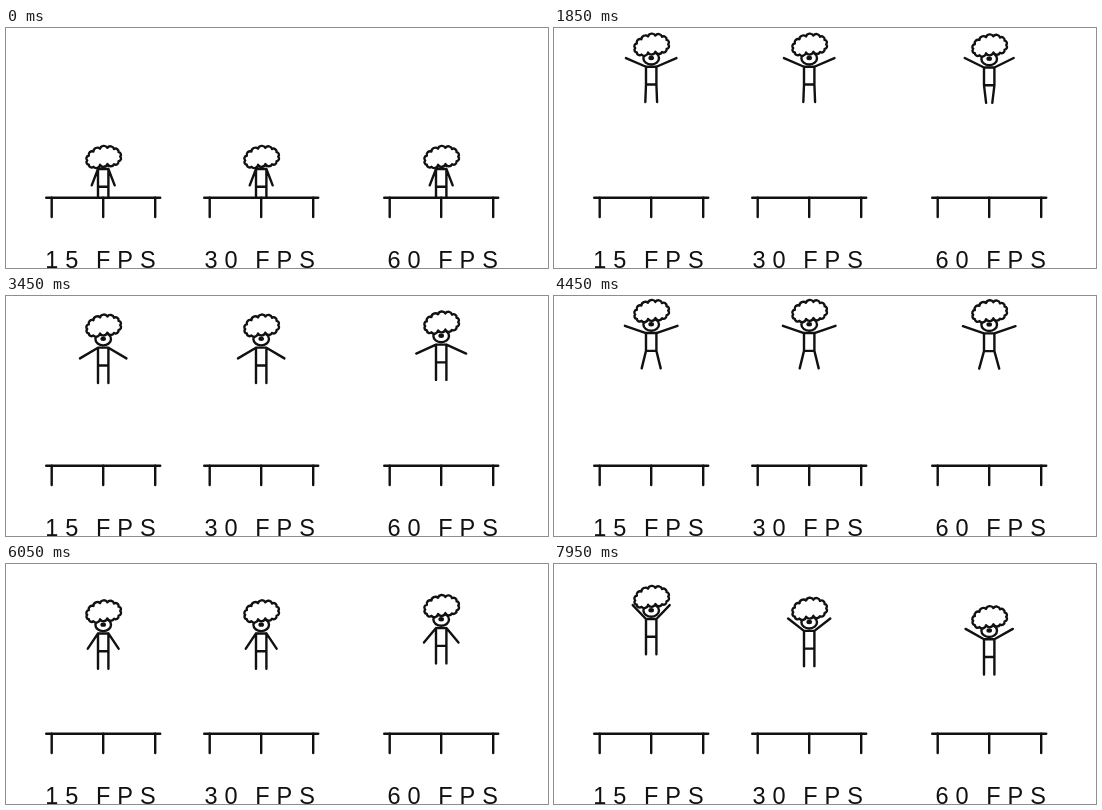
Write an HTML page that moves like this. It is 542 by 240 pixels and loops after 8 s.

```html
<!DOCTYPE html>
<html lang="en">
<head>
<meta charset="utf-8">
<title>Frame rate comparison</title>
<style>
  html, body { margin: 0; width: 100%; height: 100%; overflow: hidden; background: #fff; }
  svg { display: block; width: 542px; height: 240px; }
  path, ellipse { fill: none; stroke: #111; stroke-width: 2.4; stroke-linecap: round; stroke-linejoin: round; }
  .solid { fill: #fff; }
  .eye { fill: #111; stroke: none; }
  text { font: 23.5px "Liberation Sans", Arial, sans-serif; letter-spacing: 7px; word-spacing: -3px; fill: #111; }
</style>
</head>
<body>
<svg id="stage" viewBox="0 0 542 240"></svg>
<script>
const STEP_MS = 50, LOOP_STEPS = 160, JUMP_STEPS = 56;
const BED_Y = 169.8, TOP_Y = 36, JUMP_HEIGHT = 105;

function smoothstep(from, to, step) {
  const u = Math.min(1, Math.max(0, (step - from) / (to - from)));
  return u * u * (3 - 2 * u);
}

// Quick rise that slows down, then a fall that speeds up and settles
function shoulderY(step) {
  const rise = Math.max(0, 1 - step / 28) ** 3.4;
  const t = step - 48.2;
  const fall = t < 0 ? 0.5 * Math.exp(0.242 * t) : 1 - 0.5 * Math.exp(-0.345 * t);
  return TOP_Y + JUMP_HEIGHT * Math.max(rise, fall);
}

function armAngle(step) {
  const degrees = -74 + 99 * smoothstep(4, 24, step) + 30 * smoothstep(33, 44, step)
    - 129 * smoothstep(44, 57, step);
  return degrees * Math.PI / 180;
}

// The legs kick open and shut around the top of the jump
function footSpread(step) {
  const kicking = step >= 16 && step <= 40;
  return kicking ? 10 * Math.abs(Math.sin(Math.PI * (step - 18) / 10)) : 5.2;
}

function hairDrop(step) {
  const fromLanding = Math.min(step, JUMP_STEPS - step);
  return Math.max(0, 10 - 2.5 * fromLanding);
}

// A tilted ring of bumps with a fringe lifted off the face
function hairPath() {
  const bumps = 14;
  const points = Array.from({ length: bumps }, (_, i) => {
    const angle = 2 * Math.PI * i / bumps;
    const x = 16.5 * Math.cos(angle), down = Math.sin(angle);
    const fringe = 5 * Math.max(0, down) ** 6;
    return [x, 10.5 * down - 0.12 * x - fringe];
  });
  const arcs = points.map(([x, y], i) => {
    const [nextX, nextY] = points[(i + 1) % bumps];
    const radius = Math.hypot(nextX - x, nextY - y) * 0.55;
    return `A${radius} ${radius} 0 0 1 ${nextX} ${nextY}`;
  });
  return `M${points[0]}${arcs.join("")}Z`;
}

function add(parent, tag, attributes) {
  const node = document.createElementNS("http://www.w3.org/2000/svg", tag);
  for (const name in attributes) node.setAttribute(name, attributes[name]);
  return parent.appendChild(node);
}

function makeJumper(centerX, labelX, fps) {
  const group = add(stage, "g", { transform: `translate(${centerX} 0)` });
  add(group, "path", { d: `M-57 ${BED_Y}H57` });
  for (const x of [-51.5, 0, 52]) add(group, "path", { d: `M${x} ${BED_Y}V189` });
  add(stage, "text", { x: labelX, y: 239.5 }).textContent = `${fps} FPS`;
  const body = add(group, "path", {});
  const head = add(group, "g", {});
  add(head, "ellipse", { class: "solid", cx: 0, cy: -8.6, rx: 7.8, ry: 6.3 });
  add(head, "ellipse", { class: "eye", cx: 0, cy: -8.8, rx: 2.8, ry: 2.2 });
  const hair = add(group, "path", { class: "solid", d: hairPath() });
  const hold = 60 / fps;
  return { hold, delay: Math.floor(hold / 4), body, head, hair };
}

function pose({ body, head, hair }, step) {
  const y = shoulderY(step), angle = armAngle(step), footX = footSpread(step);
  const handX = 5 + 23.5 * Math.cos(angle), handY = y - 17 * Math.sin(angle);
  const hipY = y + 17.8, footY = Math.min(hipY + 17.5, BED_Y - 1);
  const side = sign => `M${sign * handX} ${handY}L${sign * 5.2} ${y}V${hipY}L${sign * footX} ${footY}`;
  body.setAttribute("d", `${side(-1)}${side(1)}M-5.2 ${y}H5.2M-5.2 ${hipY}H5.2`);
  head.setAttribute("transform", `translate(0 ${y})`);
  hair.setAttribute("transform", `translate(0.5 ${y - 20.5 + hairDrop(step)})`);
}

const stage = document.getElementById("stage");
const jumpers = [makeJumper(97.2, 39.3, 15), makeJumper(255.2, 198.5, 30), makeJumper(435.2, 381.5, 60)];

function draw() {
  const step = Math.floor(performance.now() / STEP_MS) % LOOP_STEPS % JUMP_STEPS;
  for (const jumper of jumpers) {
    const { hold, delay } = jumper;
    pose(jumper, Math.max(0, Math.floor((step - delay) / hold) * hold));
  }
  requestAnimationFrame(draw);
}
draw();
</script>
</body>
</html>
```
